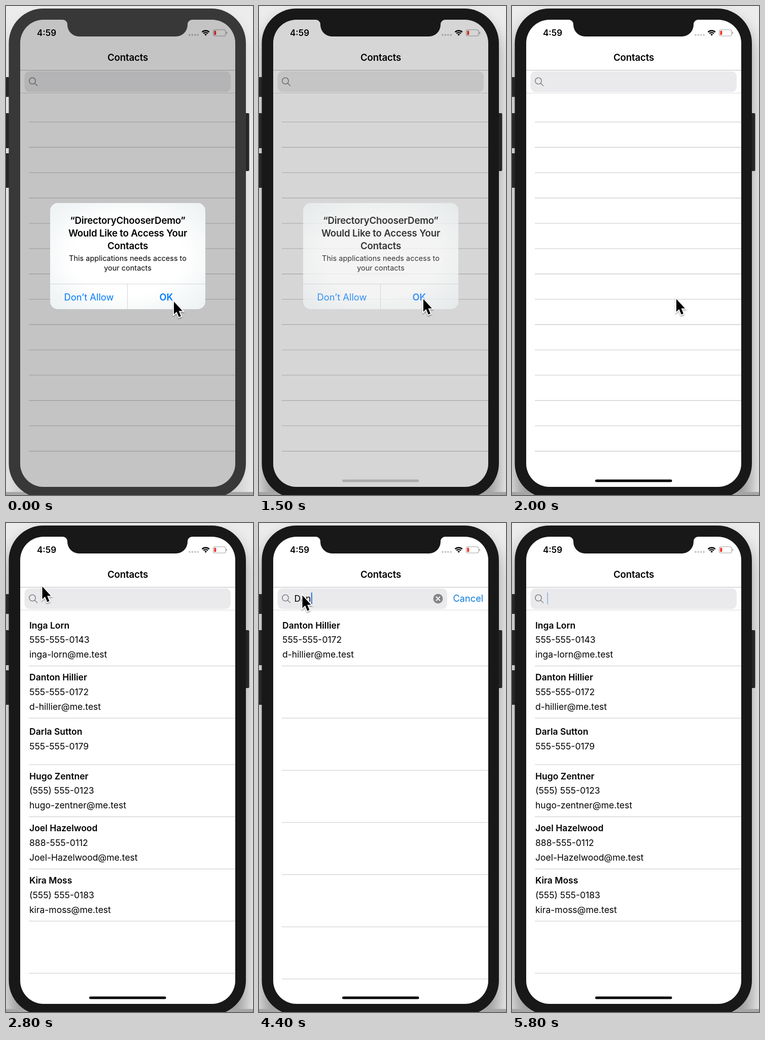
Write an HTML page that moves like this. It is 487 by 963 pixels and loops after 5.9 s.

```html
<!DOCTYPE html>
<html lang="en">
<head>
<meta charset="utf-8">
<title>Contacts</title>
<style>
  html, body { margin: 0; width: 100%; height: 100%; overflow: hidden; background: #ececec; }
  svg { display: block; }
  text { font: 17.5px Inter, sans-serif; }
  .semi { font-weight: 600; }
  .title { font-size: 18.7px; font-weight: 600; letter-spacing: -.2px; }
  .mid { text-anchor: middle; }
  .note { font-size: 14.5px; }
  .button { font-size: 18.3px; fill: #007aff; }
  .rule { stroke: #c8c8ca; stroke-width: 1.1; }
</style>
</head>
<body>
<svg width="487" height="963" viewBox="0 0 487 963">
  <defs>
    <clipPath id="screenShape"><rect x="28" y="27" width="424" height="920" rx="46"/></clipPath>
    <radialGradient id="frost" r=".65">
      <stop offset=".55" stop-color="#fff"/>
      <stop offset="1" stop-color="#eef3f4"/>
    </radialGradient>
    <filter id="glow" x="-20%" y="-10%" width="140%" height="120%">
      <feGaussianBlur stdDeviation="16"/>
    </filter>
    <filter id="soft" x="-50%" y="-50%" width="200%" height="200%">
      <feDropShadow dx="0" dy="2" stdDeviation="1.3" flood-opacity=".4"/>
    </filter>
  </defs>

  <rect width="487" height="963" fill="#ececec"/>
  <rect id="shadow" x="5.5" y="24" width="467" height="990" rx="68" filter="url(#glow)"/>
  <rect y="957" width="487" height="6" fill="#a6a6a6"/>
  <g fill="#262626">
    <rect x="-3" y="140" width="10" height="39" rx="2"/>
    <rect x="-3" y="211" width="10" height="69" rx="2"/>
    <rect x="-3" y="290" width="10" height="68" rx="2"/>
    <rect x="470" y="211" width="9.5" height="114" rx="2"/>
  </g>
  <rect class="bezel" x="5.500" y="5" width="467.500" height="964" rx="68"/>

  <g clip-path="url(#screenShape)">
    <rect x="28" y="27" width="424" height="920" fill="#fff"/>
    <g id="list"></g>
    <text class="title mid" x="240" y="108">Contacts</text>
    <path class="rule" d="M28 126.5H452" style="stroke:#bcbcbe"/>
    <path class="rule" d="M28 171.5H452" style="stroke:#dcdcde"/>
    <rect id="field" x="36.5" y="128.5" height="41" rx="10" fill="#eaeaec"/>
    <g fill="none" stroke="#85858a" stroke-width="1.6" stroke-linecap="round">
      <circle cx="52" cy="147.5" r="6.2"/>
      <path d="M56.5 152L61.5 157"/>
    </g>
    <text id="query" x="69.5" y="155"></text>
    <rect id="caret" y="137" width="2.2" height="23" fill="#3a78d8"/>
    <g id="cancel">
      <circle cx="353" cy="149" r="9.5" fill="#858589"/>
      <path d="M349.5 145.5l7 7m0-7l-7 7" stroke="#fff" stroke-width="1.8" stroke-linecap="round"/>
      <text x="382.5" y="155" fill="#0b7bdf" style="font-size:18.2px">Cancel</text>
    </g>

    <text class="semi" x="61" y="59" style="font-size:17px">4:59</text>
    <path d="M362 57h17" stroke="#bdbdbf" stroke-width="3.6" stroke-linecap="round" stroke-dasharray="0 5.4"/>
    <g transform="translate(393.7 58.6)" fill="none" stroke="#000" stroke-width="2.4">
      <path d="M-7.1-7.1A10 10 0 0 1 7.1-7.1M-4.4-4.4A6.2 6.2 0 0 1 4.4-4.4"/>
      <path d="M-2.4-2.4A3.4 3.4 0 0 1 2.4-2.4L0 0Z" fill="#000" stroke="none"/>
    </g>
    <rect x="408.5" y="46.8" width="24.5" height="12.2" rx="3.5" fill="none" stroke="#a3a3a5" stroke-width="1.1"/>
    <rect x="434.3" y="50.8" width="1.6" height="4.4" rx=".8" fill="#a3a3a5"/>
    <rect x="410.3" y="48.7" width="4" height="8.4" rx="1.4" fill="#f5322b"/>

    <rect id="dim" x="28" y="27" width="424" height="920"/>
    <rect id="home" x="164" y="932.5" width="151.5" height="5" rx="2.5"/>
  </g>
  <path class="bezel" d="M112 26V27A9 9 0 0 1 121 36V37A23 23 0 0 0 144 60H335A23 23 0 0 0 358 37V36A9 9 0 0 1 367 27V26Z"/>

  <g id="alert">
    <rect x="87" y="388" width="306" height="209" rx="15" fill="url(#frost)"/>
    <path d="M87 547.5H393M239.5 547.5V597" stroke="#d0d5d8"/>
    <g class="mid">
      <text class="title" x="240" y="429">“DirectoryChooserDemo”</text>
      <text class="title" x="240" y="454">Would Like to Access Your</text>
      <text class="title" x="240" y="479">Contacts</text>
      <text class="note" x="240" y="502">This applications needs access to</text>
      <text class="note" x="240" y="520.5">your contacts</text>
      <text class="button" x="163.5" y="579.5">Don’t Allow</text>
      <text class="button semi" x="316" y="579.5">OK</text>
    </g>
  </g>

  <path id="cursor" filter="url(#soft)" stroke="#fff" stroke-width="3.6" paint-order="stroke"
        d="M0 0V25L5.5 20L9.8 30.5L14 28.8L9.7 18.5H17Z"/>
</svg>

<script>
const LOOP = 5900, STEP = 100;
const LIST_TOP = 178.7, LIST_BOTTOM = 908, LINE = 28.75;
const EMPTY_ROW = 49.85, SHORT_ROW = 91.5, FULL_ROW = 102.75;

const contacts = [
  ['Inga Lorn', '555-555-0143', 'inga-lorn@me.test'],
  ['Danton Hillier', '555-555-0172', 'd-hillier@me.test'],
  ['Darla Sutton', '555-555-0179'],
  ['Hugo Zentner', '(555) 555-0123', 'hugo-zentner@me.test'],
  ['Joel Hazelwood', '888-555-0112', 'Joel-Hazelwood@me.test'],
  ['Kira Moss', '(555) 555-0183', 'kira-moss@me.test']
];

// Each track holds a value from its start time until the next entry.
const tracks = {
  cursor: [[0, [331, 582]], [200, [332, 584]], [300, [333, 585]], [500, [332, 584]], [600, [330, 583]],
    [700, [327, 580]], [800, [324, 577]], [2500, [170, 320]], [2600, [70, 123]], [2800, [71.5, 125]],
    [2900, [78, 133]], [3000, [85.5, 142.5]], [5700, [328, 325]], [5800, [-99, -99]]],
  query: [[0, ''], [3900, 'D'], [4000, 'Da'], [4300, 'Dan'], [4700, 'Da'], [4900, 'D'], [5100, '']],
  caret: [[0, 0], [3000, .5], [3100, 1], [3400, 0], [3900, 1], [5700, .75], [5800, .4]],
  alert: [[0, 1], [1500, .75], [1600, .3], [1700, .1], [1800, .03], [1900, 0]],
  dim: [[0, .23], [1500, .16], [1600, .055], [1700, .02], [1800, 0]],
  home: [[0, 0], [1500, .2], [1600, .55], [1700, .8], [1800, .93], [1900, 1]]
};

const el = id => document.getElementById(id);
const valueAt = (name, t) => tracks[name].findLast(([start]) => start <= t)[1];
const rule = y => `<path class="rule" d="M45 ${y}H452"/>`;

function listMarkup(people) {
  let y = LIST_TOP, height = EMPTY_ROW, markup = '';
  for (const lines of people) {
    const short = lines.length < 3;
    height = short ? SHORT_ROW : FULL_ROW;
    lines.forEach((line, i) => {
      const baseline = y + (short ? 33 : 28.8) + i * LINE;
      markup += `<text class="${i ? '' : 'semi'}" x="46" y="${baseline}">${line}</text>`;
    });
    markup += rule(y += height);
  }
  while ((y += height) < LIST_BOTTOM) markup += rule(y);
  return markup;
}

let shownList;
function showList(loaded, query) {
  const key = loaded + query;
  if (key === shownList) return;
  shownList = key;
  const matches = ([name]) => name.toLowerCase().includes(query.toLowerCase());
  el('list').innerHTML = listMarkup(loaded ? contacts.filter(matches) : []);
}

function render(now) {
  const t = Math.floor(now % LOOP / STEP) * STEP;
  const active = t >= 1500;
  const query = valueAt('query', t);

  showList(t >= 2100, query);
  document.querySelectorAll('.bezel').forEach(b => b.setAttribute('fill', active ? '#181818' : '#383838'));
  el('shadow').setAttribute('opacity', active ? .35 : .12);
  for (const id of ['alert', 'dim', 'home', 'caret']) el(id).setAttribute('opacity', valueAt(id, t));

  el('query').textContent = query;
  el('caret').setAttribute('x', query ? 70 + el('query').getComputedTextLength() : 69);
  el('field').setAttribute('width', query ? 334.5 : 406.5);
  el('cancel').setAttribute('visibility', query ? 'visible' : 'hidden');
  el('cursor').setAttribute('transform', `translate(${valueAt('cursor', t)})`);
}

const started = performance.now();
function tick() {
  render(performance.now() - started);
  requestAnimationFrame(tick);
}
tick();
</script>
</body>
</html>
```
